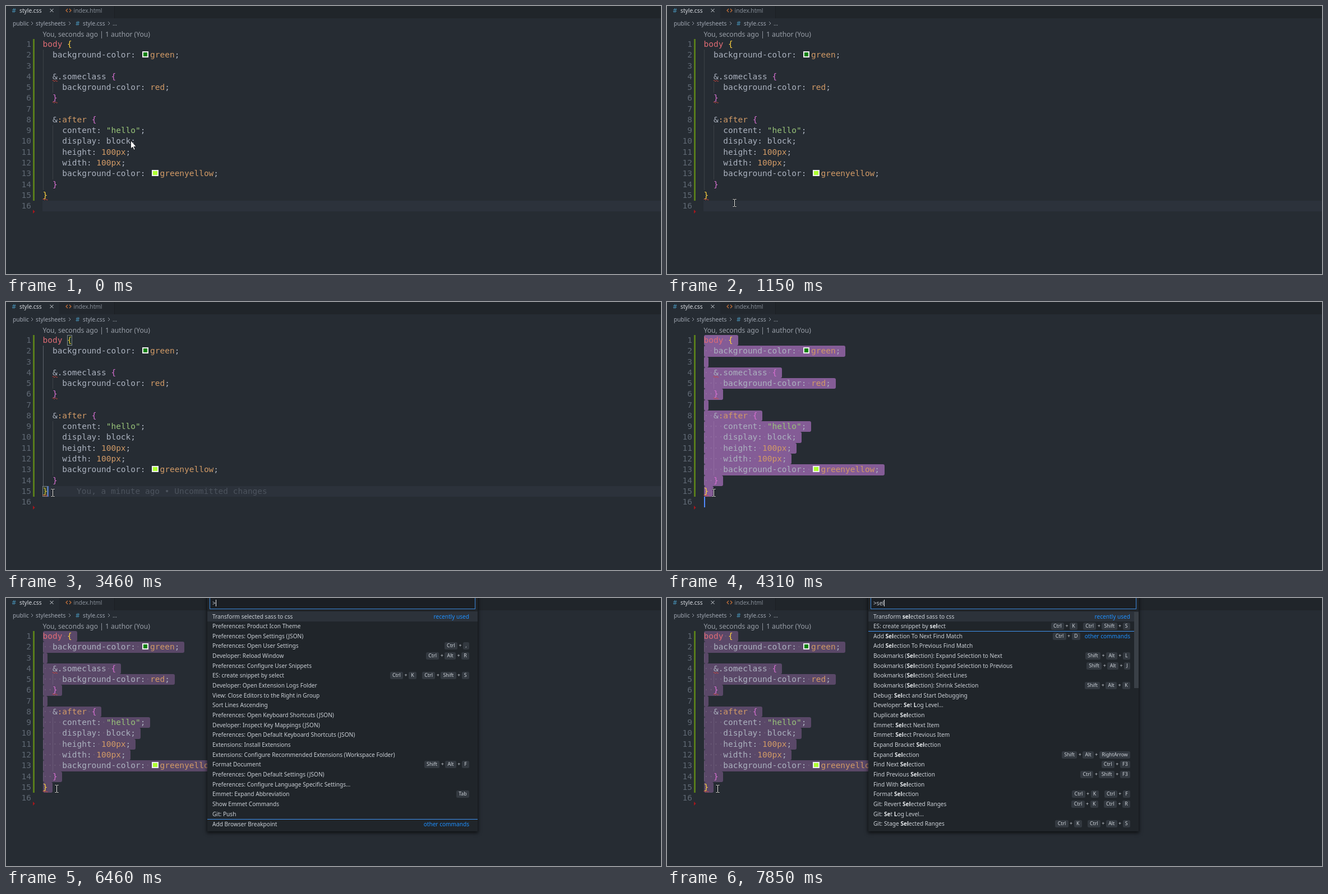
Animation, 1168 px wide and 479 px high, one loop 8000 ms. Source, as an HTML page:

```html
<!DOCTYPE html>
<html lang="en">
<head>
<meta charset="utf-8">
<title>Editor</title>
<style>
html, body { margin: 0; width: 100%; height: 100%; overflow: hidden; background: #262c33; }
#stage { position: relative; width: 1168px; height: 479px; overflow: hidden; background: #262c33;
  color: #abb2bf; font: 10.2px/16px "Noto Sans", "Open Sans", sans-serif; white-space: pre; }
#stage .at, .line, .num, .dots { position: absolute; }
.line, .num, #blame { font: 14.48px/19.27px "DejaVu Sans Mono", monospace; }
.line { left: 65.5px; }
.line > span { display: block; position: relative; height: 19.27px; padding-right: 8.72px; border-radius: 3px; }
.num { left: 10px; width: 35px; text-align: right; color: #5f6873; }
.dots { left: 0; top: 0; color: rgba(255,255,255,.11); visibility: hidden; }
.active .line > span { background: #845c96; }
.dim .line > span { background: #5a4868; }
.active .dots, .dim .dots { visibility: visible; }
.red { color: #e06c75; } .orange { color: #d19a66; } .green { color: #98c379; }
.gold { color: #ffd23f; } .orchid { color: #d670d0; }
.swatch { display: inline-block; box-sizing: border-box; width: .8em; height: .8em;
  margin: .1em .2em 0; border: 2px solid #eee; }
.guide { width: 1px; background: rgba(255,255,255,.1); }
.match { width: 7px; height: 17px; border: 1px solid #80868c; background: rgba(0,100,0,.12); }
#band { left: 65px; width: 1103px; height: 19px; background: #2c323b; }
#caret { width: 2px; height: 19px; background: #528bff; }
#blame { left: 126px; color: #4c535d; }
#palette { left: 359px; top: -20px; width: 482px; height: 437px; background: #20252a; color: #ccd1d7;
  box-shadow: 0 2px 6px 1px rgba(0,0,0,.65); font-size: 10.12px; }
#input { left: 4px; top: 10px; width: 472px; height: 28px; border: 1px solid #3b87d8; background: #1b1f24; }
#typed { left: 9px; top: 21px; }
#typed i { display: inline-block; width: 1px; height: 12px; background: #e6e8eb; vertical-align: -2px; }
.list { left: 0; top: 44.2px; width: 482px; }
.row { position: absolute; box-sizing: border-box; left: 0; width: 482px; height: 17.65px; padding: 0 15px 0 9px;
  display: flex; align-items: center; line-height: 17px; }
.row.first { background: #2c323a; }
.row.split { border-top: 1px solid #3f93f0; }
.row b { color: #e8ebee; font-weight: 700; }
.label { flex: 1; }
.group { color: #1e90ff; margin-left: 8px; }
.keys { display: flex; align-items: center; font-size: 8.8px; line-height: 13px; }
.keys kbd { font: inherit; padding: 0 4.3px; height: 13px; border-radius: 2.5px; background: #333940; }
.keys u { width: 10px; text-align: center; text-decoration: none; }
#thumb { left: 474px; top: 45px; width: 8px; background: #3a4047; }
svg { position: absolute; left: 0; top: 0; overflow: visible; fill: none; }
</style>
</head>
<body>
<div id="stage">
  <div class="at" style="left:95px;top:0;width:1073px;height:22px;background:#20252a"></div>
  <div class="at" style="left:95px;top:0;width:98px;height:22px;background:#22272d;border-right:1px solid #1b1f24"></div>
  <svg width="1168" height="479">
    <path d="M78.5 5l6 6m0-6l-6 6" stroke="#cfd3d9"/>
    <path d="M110 5l-3 3 3 3m3-6l3 3-3 3" stroke="#c8713a" stroke-width="1.2"/>
    <path d="M45 28l3 3-3 3M112 28l3 3-3 3M182 28l3 3-3 3" stroke="#9299a4"/>
    <path d="M48 364l3.6 3.5-3.6 3.5z" fill="#a3171d"/>
  </svg>
  <div class="at" id="band"></div>
  <div id="code"></div>
  <div class="at" style="left:48px;top:59px;width:3px;height:289px;background:#587c1c"></div>
  <div class="at" id="blame">You, a minute ago • Uncommitted changes</div>
  <div class="at match" style="left:109px;top:59px"></div>
  <div class="at match" style="left:65px;top:329px"></div>
  <div class="at" id="caret"></div>
  <svg width="1168" height="479">
    <g id="squiggles" stroke="#d1483f"></g>
    <path id="arrow" d="M222.5 240.5v14.5l3.3-3 2.3 5.3 2.2-1-2.3-5h4.3z" fill="#fff" stroke="#15181c" stroke-width=".9"/>
    <g id="beam">
      <path d="M-3-6.5h2.2l.8.7.8-.7H3M0-6V6M-3 6.5h2.2l.8-.7.8.7H3" stroke="#14171a" stroke-width="2.6"/>
      <path d="M-3-6.5h2.2l.8.7.8-.7H3M0-6V6M-3 6.5h2.2l.8-.7.8.7H3" stroke="#f2f2f2"/>
    </g>
  </svg>
  <div class="at" id="palette">
    <div class="at" id="input"></div>
    <div class="at" id="typed"><span></span><i></i></div>
    <div class="at" id="thumb"></div>
  </div>
</div>
<script>
const $ = id => document.getElementById(id);
const stage = $("stage"), code = $("code"), palette = $("palette");
const LINE = 19.27, CHAR = 8.72, ROW = 17.65, LOOP = 8000;
const lineTop = n => 59 + (n - 1) * LINE;

function add(parent, cls, css, html = "") {
  const el = document.createElement("div");
  el.className = cls;
  el.style.cssText = css;
  el.innerHTML = html;
  parent.append(el);
  return el;
}

// Tabs, breadcrumbs and author line
const label = (x, y, text, color, size = 10.2) =>
  add(stage, "at", `left:${x}px;top:${y - 8}px;color:${color};font-size:${size}px`, text);
label(10.5, 8, "#", "#4b9cc4", 11.5);
label(24, 8, "style.css", "#d7dae0");
label(120.5, 8, "index.html", "#868d97");
label(12, 31, "public", "#a0a7b2");
label(53, 31, "stylesheets", "#a0a7b2");
label(124, 31, "#", "#4b9cc4", 11.5);
label(137, 31, "style.css", "#a0a7b2");
label(190, 31, "…", "#a0a7b2");
label(65.5, 51, "You, seconds ago | 1 author (You)", "#999fa8", 12.1);

// Code
const source = `body {
  background-color: green;

  &.someclass {
    background-color: red;
  }

  &:after {
    content: "hello";
    display: block;
    height: 100px;
    width: 100px;
    background-color: greenyellow;
  }
}
`.split("\n");

const span = (cls, text) => `<span class="${cls}">${text}</span>`;
function paint(line) {
  const brace = line.startsWith(" ") ? "orchid" : "gold";
  return line.replace(/[{}]|"\w+"|^body|:after|\b(?:greenyellow|green|red|100px)\b|&/g, s => {
    if (s === "&") return "&amp;";
    if (/[{}]/.test(s)) return span(brace, s);
    if (s[0] === '"') return span("green", s);
    if (s === "body") return span("red", s);
    const swatch = s.startsWith("green") ? `<span class="swatch" style="background:${s}"></span>` : "";
    return swatch + span("orange", s);
  });
}

source.forEach((line, i) => {
  const top = `top:${lineTop(i + 1)}px`;
  add(code, "num", top, i + 1);
  if (i === 15) return;
  const dots = line.replace(/\S/g, "\0").replace(/ /g, "·").replace(/\0/g, " ");
  add(code, "line", top, `<span>${span("dots", dots)}${paint(line)}</span>`);
});

const guide = (x, from, to) =>
  add(code, "at guide", `left:${x}px;top:${lineTop(from)}px;height:${(to - from + 1) * LINE}px`);
const outer = guide(66, 2, 14);
guide(83, 5, 5);
guide(83, 9, 13);

$("squiggles").innerHTML = [[2, 4], [2, 6], [0, 15]].map(([col, n]) =>
  `<path d="M${65.5 + col * CHAR} ${lineTop(n) + 17}q1.1-2.6 2.2 0t2.2 0 2.2 0 2.2 0"/>`).join("");

// Command palette: "label|keys", chords separated by a space
const recent = `Transform selected sass to css
Preferences: Product Icon Theme
Preferences: Open Settings (JSON)
Preferences: Open User Settings|Ctrl+,
Developer: Reload Window|Ctrl+Alt+R
Preferences: Configure User Snippets
ES: create snippet by select|Ctrl+K Ctrl+Shift+S
Developer: Open Extension Logs Folder
View: Close Editors to the Right in Group
Sort Lines Ascending
Preferences: Open Keyboard Shortcuts (JSON)
Developer: Inspect Key Mappings (JSON)
Preferences: Open Default Keyboard Shortcuts (JSON)
Extensions: Install Extensions
Extensions: Configure Recommended Extensions (Workspace Folder)
Format Document|Shift+Alt+F
Preferences: Open Default Settings (JSON)
Preferences: Configure Language Specific Settings...
Emmet: Expand Abbreviation|Tab
Show Emmet Commands
Git: Push`.split("\n");
const others = `Add Browser Breakpoint
Add Cursor Above|Ctrl+Shift+UpArrow
Add Cursor Below|Ctrl+Shift+DownArrow
Add Cursors To Bottom`.split("\n");
const selecting = `Add Selection To Next Find Match|Ctrl+D
Add Selection To Previous Find Match
Bookmarks (Selection): Expand Selection to Next|Shift+Alt+L
Bookmarks (Selection): Expand Selection to Previous|Shift+Alt+J
Bookmarks (Selection): Select Lines
Bookmarks (Selection): Shrink Selection|Shift+Alt+K
Debug: Select and Start Debugging
Developer: Set Log Level...
Duplicate Selection
Emmet: Select Next Item
Emmet: Select Previous Item
Expand Bracket Selection
Expand Selection|Shift+Alt+RightArrow
Find Next Selection|Ctrl+F3
Find Previous Selection|Ctrl+Shift+F3
Find With Selection
Format Selection|Ctrl+K Ctrl+F
Git: Revert Selected Ranges|Ctrl+K Ctrl+R
Git: Set Log Level...
Git: Stage Selected Ranges|Ctrl+K Ctrl+Alt+S`.split("\n");

const markS = s => s.replace(/\bs/i.test(s) ? /\bs/i : /s/i, "<b>$&</b>");
const markSel = s => /\bsel/i.test(s)
  ? s.replace(/\bsel/i, "<b>$&</b>")
  : s.replace(/\b(Se)t (L)/, "<b>$1</b>t <b>$2</b>");

const keycaps = keys => `<span class="keys">${keys.split(" ").map(chord =>
  chord.split("+").map(k => `<kbd>${k}</kbd>`).join("<u>+</u>")).join("<u></u>")}</span>`;

function buildList(top, rest, mark) {
  const list = add(palette, "at list", "");
  [...top, ...rest].forEach((item, i) => {
    const [text, keys] = item.split("|");
    const split = i === top.length;
    const group = i === 0 ? "recently used" : split ? "other commands" : "";
    add(list, "row" + (i ? "" : " first") + (split ? " split" : ""), `top:${i * ROW}px`,
      span("label", mark(text)) + (keys ? keycaps(keys) : "") + (group && span("group", group)));
  });
  return list;
}
const lists = [
  buildList(recent, others.slice(0, 1), s => s),
  buildList(recent.filter(s => /s/i.test(s.split("|")[0])), others, markS),
  buildList([recent[0], recent[6]], selecting, markSel),
];
palette.append($("thumb"));

// Timeline
const pointer = [
  [0, 222.5, 240.5], [310, 206, 250], [390, 196, 258], [460, 190, 261], [620, 184, 270],
  [690, 180, 279], [850, 160, 310], [920, 143, 335], [1000, 131.5, 348], [1150, 120.5, 352],
  [1230, 100, 353], [1310, 84.5, 353], [1460, 84, 352.5], [1620, 83.5, 341],
  [4770, 85.5, 341], [4850, 88, 341], [4920, 90.5, 341],
];
const typing = [[0, ">"], [7620, ">s"], [7770, ">se"], [7850, ">sel"]];
const latest = (steps, t) => steps.filter(s => s[0] <= t).pop();
const clamp = v => Math.min(1, Math.max(0, v));
const ease = v => v * v * (3 - 2 * v);
const show = (el, on) => { el.style.visibility = on ? "visible" : "hidden"; };

// Soft blink: solid, fade out, fade in within one second
function blink(t) {
  const p = t < 0 ? 0 : t % 1000;
  return 1 - ease(clamp((Math.min(p, 1000 - p) - 100) / 350));
}

function render(t) {
  const clicked = t >= 2690 && t < 4310, selected = t >= 4310, open = t >= 5920;

  show($("arrow"), t < 80);
  show($("beam"), t >= 80);
  const [, x, y] = latest(pointer, t);
  $("beam").setAttribute("transform", `translate(${x} ${y})`);

  show($("band"), !selected);
  $("band").style.top = (clicked ? 329 : 348) + "px";
  show($("blame"), t >= 3080 && t < 4310);
  $("blame").style.top = lineTop(15) + "px";
  document.querySelectorAll(".match").forEach(el => show(el, clicked));
  outer.style.background = clicked ? "#5d646d" : "";
  code.className = !selected ? "" : t < 5850 ? "active" : "dim";

  const caret = $("caret").style;
  caret.left = (clicked ? 73.5 : 65.5) + "px";
  caret.top = lineTop(clicked ? 15 : 16) + "px";
  caret.opacity = t < 2690 || t >= 5850 ? 0 : blink(t - (clicked ? 2690 : 4730));

  palette.style.display = open ? "" : "none";
  $("typed").firstChild.textContent = latest(typing, t)[1];
  show($("typed").lastChild, open && (t < 6540 || (t >= 7000 && t < 7460) || t >= 7540));
  const current = t < 7620 ? 0 : t < 7850 ? 1 : 2;
  lists.forEach((list, i) => { list.style.display = i === current ? "" : "none"; });
  $("thumb").style.height = (current === 2 ? 136 : 14) + "px";
  $("thumb").style.opacity = clamp((t - 6850) / 380);
}

const start = performance.now();
function tick() {
  render((performance.now() - start) % LOOP);
  requestAnimationFrame(tick);
}
render(0);
requestAnimationFrame(tick);
</script>
</body>
</html>
```
